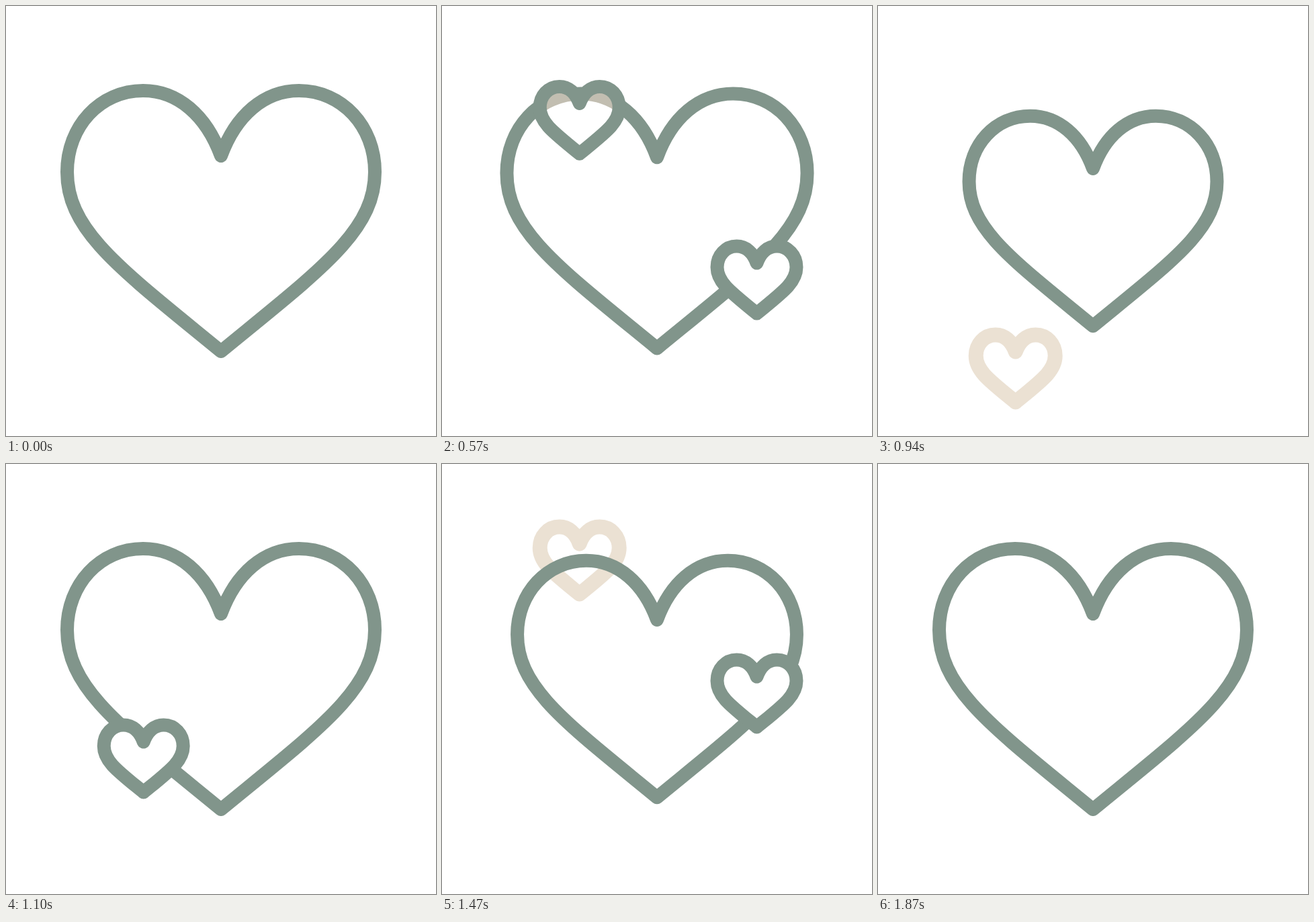
Write an HTML page with a canvas that moves like this. It is 640 px wide and 640 px high and loops after 1940 ms.

```html
<!DOCTYPE html>
<html lang="en">
<head>
<meta charset="utf-8">
<title>Hearts</title>
<style>
html, body { margin: 0; width: 100%; height: 100%; overflow: hidden; background: #fff; }
canvas { display: block; width: 100vmin; height: 100vmin; margin: 0 auto; }
</style>
</head>
<body>
<canvas id="stage" width="640" height="640"></canvas>
<script>
const ctx = document.getElementById('stage').getContext('2d');
const LOOP = 1940, STEP = 33.4;
const SAGE = '#81958b', STONE = '#c2beb1', SAND = '#ebe1d3';

// small hearts: two sides, launched twice
const LEFT = 204.7, RIGHT = 468.5, SMALL = 0.2576;
const LOW = 543, HIGH = 140, RISE = 18, FADE = 4;
const FIRST = 2, SIDE_DELAY = 8, ROUND_DELAY = 25;

// big heart: regular beats, then a slow return to full size
const PEAK = 3.9, PERIOD = 14.55, DEPTH = 0.25, END = 56;
const LAST_DIP = PEAK + 2.5 * PERIOD;

const smooth = x => x * x * (3 - 2 * x);

function heart(x, y, s) {
  const p = new Path2D();
  for (const side of [-s, s]) {
    const curve = (a, b, c, d, e, f) => p.bezierCurveTo(
      x + a * side, y + b * s, x + c * side, y + d * s, x + e * side, y + f * s);
    p.moveTo(x, y - 97 * s);
    curve(22, -157, 64, -194, 116, -194);
    curve(180, -194, 229, -141, 229, -73);
    curve(229, 15, 150, 71, 0, 194);
  }
  return p;
}

// both halves start at the notch and end at the tip, so each closes along the axis when filled
function outline(path, color, width = 20) {
  ctx.strokeStyle = color;
  ctx.lineWidth = width;
  ctx.stroke(path);
}

function beatScale(n) {
  if (n < PEAK || n >= END) return 1;
  if (n < LAST_DIP)
    return 1 - DEPTH * (1 - Math.cos(2 * Math.PI * (n - PEAK) / PERIOD)) / 2;
  return 1 - DEPTH * ((END - n) / (END - LAST_DIP)) ** 3.7;
}

function rising(n) {
  const list = [];
  for (let round = 0; round < 2; round++) {
    for (let side = 0; side < 2; side++) {
      const u = n - FIRST - side * SIDE_DELAY - round * ROUND_DELAY;
      if (u <= 0 || u >= RISE) continue;
      const y = LOW + (HIGH - LOW) * smooth(u / RISE);
      list.push({
        path: heart(side ? RIGHT : LEFT, y, SMALL),
        alpha: Math.min(1, u / FADE, (RISE - u) / FADE)
      });
    }
  }
  return list;
}

function draw(n) {
  ctx.fillStyle = '#fff';
  ctx.fillRect(0, 0, 640, 640);
  ctx.lineJoin = ctx.lineCap = 'round';

  const big = heart(320, 320, beatScale(n));
  const small = rising(n);

  for (const { path, alpha } of small)
    if (alpha < 0.7) outline(path, alpha < 0.4 ? SAND : STONE, 22);

  outline(big, SAGE);

  for (const { path, alpha } of small) {
    if (alpha < 0.7) continue;
    ctx.fillStyle = '#fff';
    ctx.fill(path);
    if (alpha < 1) {
      ctx.save();
      ctx.clip(path);
      outline(big, STONE);
      ctx.restore();
    }
    outline(path, SAGE);
  }
}

const begin = performance.now();
function tick() {
  const t = (performance.now() - begin) % LOOP;
  draw(Math.floor(t / STEP + 0.15));
  requestAnimationFrame(tick);
}
tick();
</script>
</body>
</html>
```
